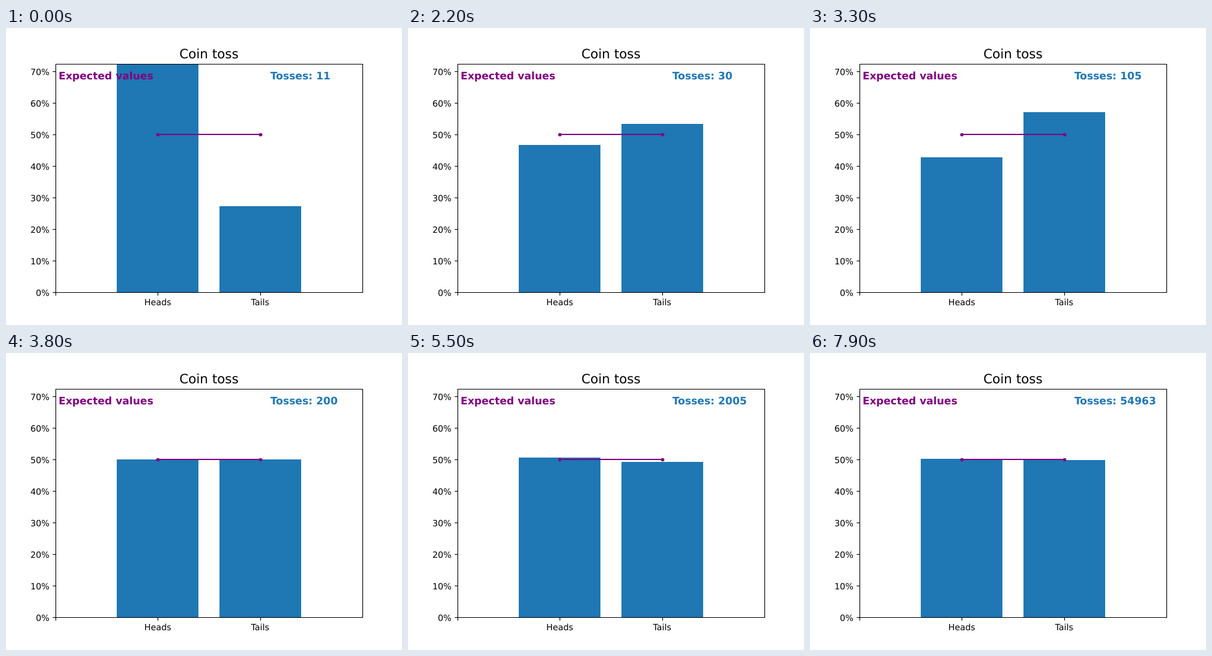
Write an HTML page that moves like this. It is 640 by 480 pixels and loops after 8 s.

```html
<!DOCTYPE html>
<html lang="en">
<head>
<meta charset="utf-8">
<title>Coin toss</title>
<style>
  html, body { margin: 0; width: 100%; height: 100%; overflow: hidden; background: #fff; }
  svg { display: block; width: 640px; height: 480px; }
  text { font-family: "DejaVu Sans", sans-serif; font-size: 13.89px; text-rendering: geometricPrecision; }
  .title { font-size: 20.83px; }
  .note { font-size: 16.67px; font-weight: bold; }
  .mid { text-anchor: middle; }
  .end { text-anchor: end; }
  .bar, .tosses { fill: #1f77b4; }
  .axis { fill: none; stroke: #000; stroke-width: 1.11; }
  .expected { fill: purple; }
</style>
</head>
<body>
<svg viewBox="0 0 640 480">
  <rect class="bar" id="heads" x="179" width="132"/>
  <rect class="bar" id="tails" x="345" width="132"/>
  <path d="M245 172H411" stroke="purple" stroke-width="2.08"/>
  <circle class="expected" cx="245.5" cy="172.5" r="2.78"/>
  <circle class="expected" cx="411.5" cy="172.5" r="2.78"/>
  <path class="axis" d="M80.5 58.5H576.5V427.5H80.5ZM80.5 427.5v5M245.5 427.5v5M411.5 427.5v5"/>
  <g id="scale"></g>
  <text class="mid" x="245.3" y="448">Heads</text>
  <text class="mid" x="410.7" y="448">Tails</text>
  <text class="title mid" x="328" y="49">Coin toss</text>
  <text class="note expected" x="85" y="83">Expected values</text>
  <text class="note tosses" id="tosses" x="427.2" y="83"></text>
</svg>
<script>
  const STEP = 100, STEPS = 80, GROWTH = 1.1481535;
  const TOP = 58, BASE = 427;
  // [tosses, heads so far]
  const RUN = [
    [11, 8], [14, 11], [15, 11], [16, 12], [17, 12], [30, 14], [33, 15],
    [93, 43], [105, 45], [119, 49], [200, 100], [298, 155], [351, 183.6],
    [1158, 592], [2005, 1016], [54963, 27565]
  ];
  const $ = id => document.getElementById(id);
  const yOf = percent => 427.2 - 5.1 * percent;

  let scale = '';
  for (let p = 0; p <= 70; p += 10) {
    const y = yOf(p);
    scale += `<path class="axis" d="M75.5 ${Math.round(y) + 0.5}h5"/>` +
      `<text class="end" x="70.3" y="${Math.round(y + 5.4)}">${p}%</text>`;
  }
  $('scale').innerHTML = scale;

  function headsAfter(n) {
    const i = Math.max(1, RUN.findIndex(p => p[0] >= n));
    const [n0, h0] = RUN[i - 1], [n1, h1] = RUN[i];
    return Math.round(h0 + (h1 - h0) * (n - n0) / (n1 - n0));
  }

  function setBar(id, share) {
    const y = Math.max(TOP, Math.round(yOf(100 * share)));
    $(id).setAttribute('y', y);
    $(id).setAttribute('height', BASE - y);
  }

  let shown = -1;
  function draw(step) {
    if (step === shown) return;
    shown = step;
    const n = 10 + Math.floor(GROWTH ** step);
    const heads = headsAfter(n);
    setBar('heads', heads / n);
    setBar('tails', 1 - heads / n);
    $('tosses').textContent = 'Tosses: ' + n;
  }

  const start = performance.now();
  function tick() {
    draw(Math.floor((performance.now() - start) / STEP) % STEPS);
    requestAnimationFrame(tick);
  }
  tick();
</script>
</body>
</html>
```
